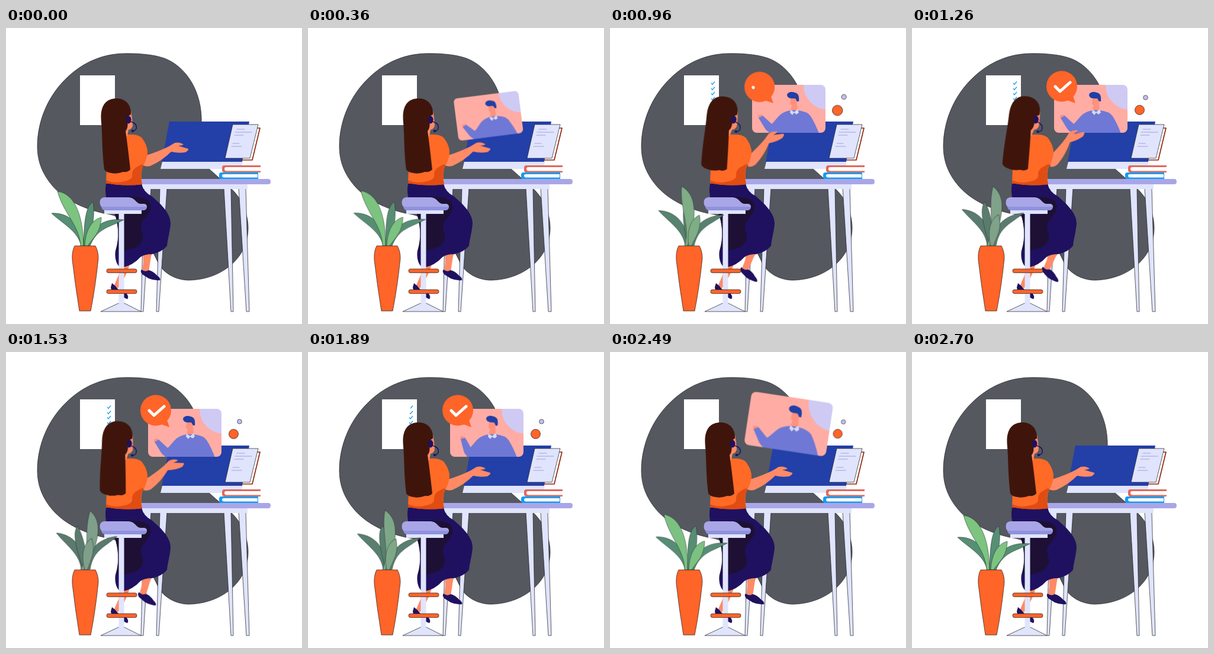
Recreate the animation shown at these times as an HTML page. Size 500 px wide and 500 px high, loop 2760 ms.

```html
<!DOCTYPE html>
<html lang="en">
<head>
<meta charset="utf-8">
<title>Video call at the desk</title>
<style>
  html, body { margin: 0; width: 100%; height: 100%; overflow: hidden; background: #fff; }
  svg { display: block; width: 100vw; height: 100vh; }

  .edge { stroke: #1c1c22; stroke-width: .7; }
  .pale { fill: #e0e4fc; }
  .lilac { fill: #a9a6e8; }
  .navy { fill: #1f1160; }
  .orange { fill: #ff6428; }
  .skin { fill: #ff8a66; }
  .line { fill: none; stroke-linecap: round; stroke-linejoin: round; }

  .leaf, .lean, .wave, .card, .dots, .bubble, .check, .tick {
    animation: 2760ms linear infinite backwards;
  }

  /* plant */
  .leaf { animation-name: sway; stroke: #26352f; stroke-width: .6; }
  .light { --from: #7cc480; --to: #7f9f8a; }
  .dark { --from: #568f74; --to: #5a7a6e; }
  @keyframes sway {
    0%, 6.52% { transform: rotate(0deg); fill: var(--from); animation-timing-function: cubic-bezier(.37, 0, .63, 1); }
    55.43% { transform: rotate(var(--turn)); fill: var(--to); animation-timing-function: cubic-bezier(.37, 0, .63, 1); }
    97.83%, 100% { transform: rotate(0deg); fill: var(--from); }
  }

  /* head, forearm and leg */
  .lean { animation-name: lean; }
  @keyframes lean {
    0%, 10.87% { transform: rotate(0deg); animation-timing-function: cubic-bezier(.37, 0, .63, 1); }
    42.39% { transform: rotate(var(--turn)); }
    43.48% { transform: rotate(var(--turn)); animation-timing-function: cubic-bezier(.37, 0, .63, 1); }
    68.48%, 100% { transform: rotate(0deg); }
  }

  /* caller */
  .wave { animation-name: wave; }
  @keyframes wave {
    0%, 56.52% { transform: rotate(0deg); animation-timing-function: cubic-bezier(.37, 0, .63, 1); }
    68.48% { transform: rotate(var(--turn)); animation-timing-function: cubic-bezier(.37, 0, .63, 1); }
    79.71%, 100% { transform: rotate(0deg); }
  }

  .card { animation-name: card; transform-origin: 364px 177px; }
  @keyframes card {
    0%, 6.52% { transform: rotate(-66deg) scale(0); animation-timing-function: cubic-bezier(.333, 1.733, .667, 1); }
    32.61% { transform: rotate(0deg) scale(1); }
    80.98% { transform: rotate(0deg) scale(1); animation-timing-function: cubic-bezier(.333, 0, .667, -.733); }
    97.46%, 100% { transform: rotate(-68deg) scale(0); }
  }

  .dots { animation-name: dots; transform-origin: 388px 130px; }
  @keyframes dots {
    0%, 17.03% { transform: scale(0); animation-timing-function: cubic-bezier(.333, 1.733, .667, 1); }
    40.58% { transform: scale(1); }
    77.17% { transform: scale(1); animation-timing-function: cubic-bezier(.333, 0, .667, -1); }
    94.2%, 100% { transform: scale(0); }
  }

  .bubble { animation-name: bubble; transform-origin: 276px 127px; }
  @keyframes bubble {
    0%, 25% { transform: rotate(-95deg) scale(0); animation-timing-function: cubic-bezier(.333, 1, .667, 1); }
    38.04% { transform: rotate(0deg) scale(1); }
    79.35% { transform: rotate(0deg) scale(1); animation-timing-function: cubic-bezier(.333, 0, .667, 0); }
    88.77%, 100% { transform: rotate(-95deg) scale(0); }
  }

  .check { animation-name: check; stroke: #fff; stroke-width: 5; stroke-dasharray: 1 2; }
  @keyframes check {
    0%, 34.05% { stroke-dashoffset: 1; opacity: 0; }
    34.06% { stroke-dashoffset: .999; opacity: 1; animation-timing-function: cubic-bezier(.37, 0, .63, 1); }
    44.93% { stroke-dashoffset: 0; opacity: 1; }
    71.01% { stroke-dashoffset: 0; opacity: 1; animation-timing-function: cubic-bezier(.37, 0, .63, 1); }
    79.7% { stroke-dashoffset: .999; opacity: 1; }
    79.71%, 100% { stroke-dashoffset: 1; opacity: 0; }
  }

  .tick { animation-name: tick; animation-delay: calc(var(--i) * 30ms); fill: none; stroke: #22a2ee; stroke-width: 1.4; stroke-dasharray: 1 2; }
  @keyframes tick {
    0%, 18.48% { stroke-dashoffset: 1; }
    25%, 66.3% { stroke-dashoffset: 0; }
    72.46%, 100% { stroke-dashoffset: -1; }
  }
</style>
</head>
<body>
<svg viewBox="0 0 500 500">
  <defs>
    <clipPath id="frame"><rect x="240" y="96" width="124" height="81" rx="8"/></clipPath>
  </defs>

  <!-- backdrop and checklist -->
  <path class="edge" fill="#55585f" d="M203 43C222 43 247 44 267 51C300 63 328 100 330 150C331 185 326 220 343 238L361 254C381 270 397 286 403 306C408 320 409 330 409 338C409 390 362 426 307 426C286 425 268 415 258 399C246 370 215 318 165 313C125 304 96 287 78 266C62 247 53 226 53 200C53 156 72 113 103 84C131 57 165 43 203 43Z"/>
  <rect x="125" y="80" width="59" height="84" fill="#fff"/>
  <path class="tick" style="--i:0" pathLength="1" d="M171 93l2 2.500 4-5"/>
  <path class="tick" style="--i:1" pathLength="1" d="M171 102l2 2.500 4-5"/>
  <path class="tick" style="--i:2" pathLength="1" d="M171 110.500l2 2.500 4-5"/>
  <path class="tick" style="--i:3" pathLength="1" d="M171 119l2 2.500 4-5"/>

  <!-- monitor -->
  <path fill="#233fa8" d="M276 158H411L399 226H263Z"/>
  <path class="pale" d="M264 226H400L397 238H261Z"/>
  <path class="line" stroke="#8e2a10" stroke-width="1.700" d="M425 169H429L416 223H399"/>
  <path class="pale edge" d="M383 163H426L412 220H370Z"/>
  <path class="line" stroke="#a3a2e2" stroke-width="1.200" d="M390 171H403M387 176H415M386 181H401M383 195H394M381 200H398"/>

  <!-- books -->
  <path fill="#e0685c" d="M430 232H369Q365 232 365 236V240Q365 244 369 244H430Z"/>
  <path fill="#fff" d="M430 235H372Q369 235 369 238T372 241.500H430Z"/>
  <path fill="#159cf2" d="M426 244H364Q360 244 360 248V252Q360 255.500 364 255.500H426Z"/>
  <path fill="#fff" d="M425 247H368Q365 247 365 249.500T368 252.500H425Z"/>

  <!-- table -->
  <g class="pale edge">
    <path d="M233 270H245L232 479H228Z"/>
    <path d="M260 270H272L258 479H254Z"/>
    <path d="M368 270H380L384 479H380Z"/>
    <path d="M393 270H405L411 479H406Z"/>
    <path d="M229 264H408V272H229Z" stroke="none"/>
  </g>
  <path class="lilac" d="M228 255H443Q447 255 447 259.500T443 264H228Z"/>

  <!-- call window -->
  <g class="card">
    <g clip-path="url(#frame)">
      <rect x="240" y="96" width="124" height="81" fill="#ffaca5"/>
      <circle cx="368" cy="97" r="41" fill="#cfcaf4"/>
      <g class="wave" style="--turn:4deg;transform-origin:312px 140px">
        <path fill="#ff917d" d="M305 117H315L317 139Q311 144 305 139L307 131L304 128Z"/>
        <path fill="#213fa4" d="M299 113C300 108 307 107 312 109C318 110 320 115 319 124H316L313 119C307 119 300 120 299 113Z"/>
      </g>
      <path fill="#6f78d4" d="M272 164L284 150Q290 142 305 139H317Q334 141 339 149Q347 162 353 178H268Z"/>
      <path fill="#d4d9f6" d="M305 138L311 142L317 137L319 143L315 146L311 143L308 147L304 143Z"/>
      <g class="wave" style="--turn:17deg;transform-origin:272px 172px">
        <path fill="#ff917d" d="M252 153C248 149 250 146 253 147L256 146L261 152L255 157Z"/>
        <path fill="#6f78d4" d="M251 152L258 148L273 162L285 153L284 178H274Q266 176 262 170Z"/>
      </g>
    </g>
  </g>
  <g class="dots">
    <circle class="orange edge" cx="384.500" cy="138.500" r="8"/>
    <circle class="edge" cx="394.500" cy="117.500" r="3.800" fill="#c5c0f0"/>
  </g>
  <g class="bubble">
    <path class="orange" d="M262 122L276 127L271 112Z"/>
    <circle class="orange" cx="253" cy="98.500" r="26"/>
    <path class="check line" pathLength="1" d="M242 99L250 107L267 92"/>
  </g>

  <!-- far leg -->
  <path class="skin" d="M194 400H209L202 418L189 440L183 434L190 418Z"/>
  <path class="navy" d="M179 431Q185 435 189 441L204 449Q208 454 205 458Q197 456 189 444Q177 446 177 438Z"/>

  <!-- near leg -->
  <g class="lean" style="--turn:16deg;transform-origin:242px 378px">
    <path class="skin" d="M231 372H250L245 386L241 412H230L232 395Z"/>
    <path class="navy" d="M229 408Q235 413 241 409Q249 411 255 418Q262 423 260 426Q250 427 241 423L230 416Q226 411 229 408Z"/>
  </g>

  <!-- skirt -->
  <path class="navy" d="M169 263H229Q232 277 246 284C260 296 278 312 278 330C277 345 273 356 272 368Q264 378 247 382Q234 382 227 387Q215 401 195 405C186 402 183 386 185 376C192 355 190 330 183 312Q164 290 169 263Z"/>
  <path fill="#1d1034" d="M176 290C205 282 231 284 241 292C250 305 240 315 232 325C223 337 233 345 231 357C226 372 211 372 203 376L186 374C192 355 190 330 183 312Z"/>

  <!-- stool -->
  <path class="pale edge" d="M190 465L160 479H228L200 465Z"/>
  <rect class="pale" x="190.500" y="312" width="9" height="157"/>
  <rect class="pale" x="166" y="307" width="63" height="7"/>
  <path fill="#8f91dd" d="M160 298H234Q238 299 238 303Q237 308 232 308H168Q161 308 160 298Z"/>
  <path class="lilac" d="M159 291Q161 286 167 286H207C219 287 219 296 227 297H234Q238 298 238 302H164Q157 302 159 291Z"/>
  <g class="orange edge">
    <rect x="170" y="407" width="51" height="6.500" rx="3"/>
    <rect x="170" y="442" width="51" height="6.500" rx="3"/>
  </g>

  <!-- torso -->
  <path fill="#ff6a26" d="M172 184L204 180Q222 179 229 185Q239 198 239 211Q238 222 232 232Q226 244 230 264Q200 268 169 262Z"/>
  <path fill="#e14c12" d="M169 257Q184 264 200 259Q215 256 213 247Q213 238 224 233L234 228L229 239Q226 249 230 264Q200 268 169 262Z"/>
  <g class="lean" style="--turn:-27deg;transform-origin:239px 227px">
    <path class="skin" d="M237 215Q257 209 275 200L285 194Q294 192 300 197Q296 199 291 199Q301 202 308 204Q309 207 303 210Q291 212 279 209Q264 224 244 233Q235 235 231 231Z"/>
  </g>
  <path fill="#ff6a26" d="M218 182Q228 182 231 188Q239 199 239 211Q238 221 233 231L222 227Z"/>

  <!-- head -->
  <g class="lean" style="--turn:11.500deg;transform-origin:208px 167px">
    <path class="skin" d="M200 140H211L213 152L214 165Q212 171 207 172L205 182L198 190Z"/>
    <path fill="#3f150b" d="M187 119C202 119 212 130 211 146Q205 148 205 156Q207 169 202 174C205 195 208 220 210 239Q206 244 198 243Q187 247 178 245Q169 244 166 239C162 205 163 185 161 160C158 132 168 119 187 119Z"/>
    <ellipse class="navy" cx="207" cy="155" rx="4.500" ry="6.500"/>
    <path class="line" stroke="#1f1160" stroke-width="1.500" d="M210 158Q222 161 220 170Q218 174 214 174"/>
    <ellipse class="navy" cx="214" cy="174" rx="2.500" ry="1.900"/>
  </g>

  <!-- plant -->
  <path class="leaf dark" style="--turn:8deg;transform-origin:132px 368px" d="M77 313C104 311 129 330 132 368L127 368C121 342 96 331 77 313Z"/>
  <path class="leaf dark" style="--turn:-20deg;transform-origin:134px 368px" d="M147 294C150 312 148 340 136 368H131C132 340 132 302 147 294Z"/>
  <path class="leaf dark" style="--turn:-13deg;transform-origin:138px 367px" d="M199 324C174 337 154 338 142 368H137C142 336 166 320 199 324Z"/>
  <path class="leaf light" style="--turn:32deg;transform-origin:128px 368px" d="M87 276C112 279 130 308 131 368H126C124 333 98 315 87 276Z"/>
  <path class="leaf light" style="--turn:-18deg;transform-origin:136px 368px" d="M161 320C160 345 149 352 138 368H133C134 345 143 324 161 320Z"/>
  <path class="orange edge" d="M116 368H151Q156 377 156 389Q151 438 143 478H124Q117 435 112 392Q111 377 116 368Z"/>
</svg>
</body>
</html>
```
